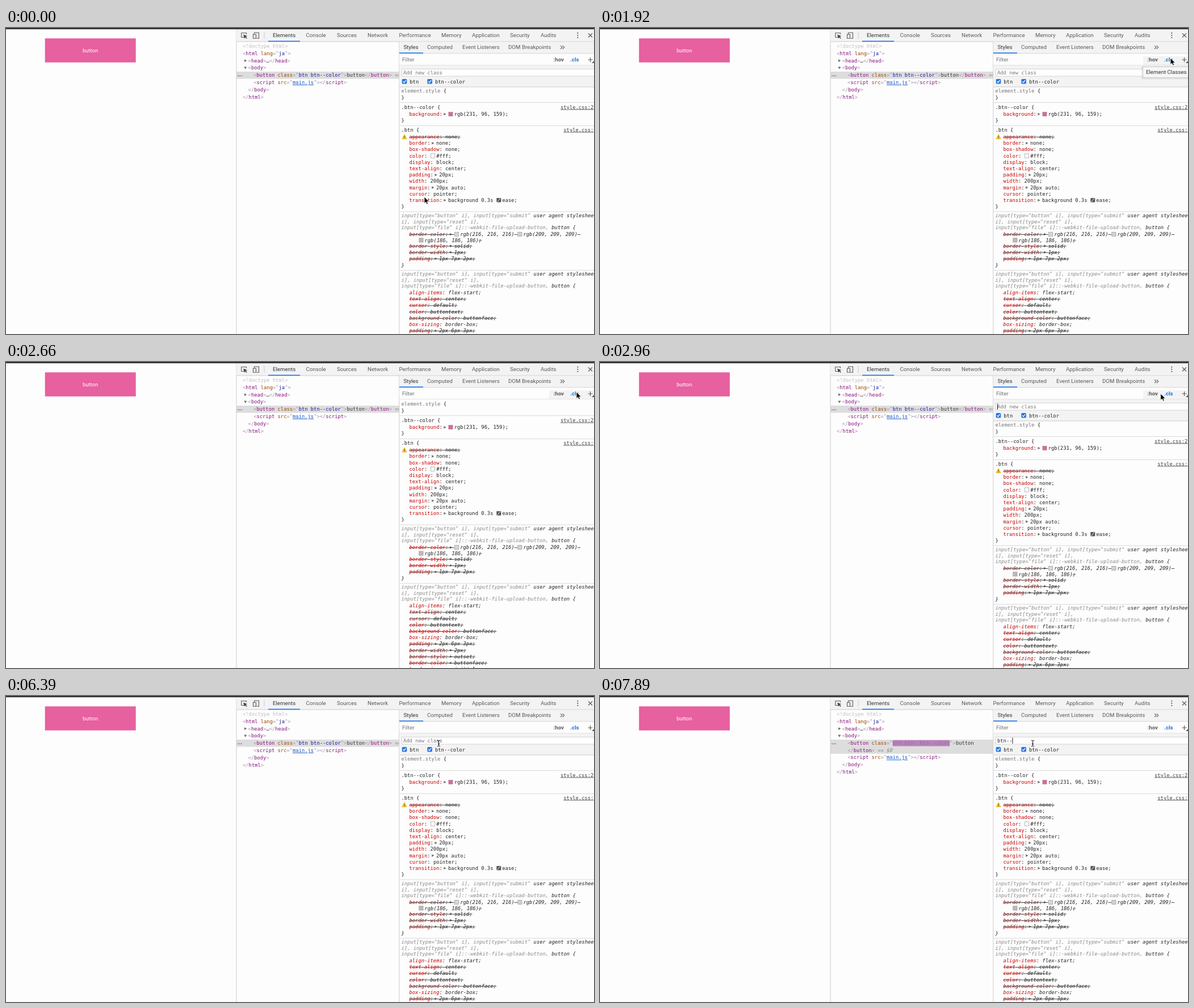
These frames come from a looping animation (1036 by 540 pixels, 8000 ms). An HTML page:

```html
<!DOCTYPE html>
<html lang="en">
<head>
<meta charset="utf-8">
<title>Toggling classes in the styles pane</title>
<style>
  html, body { margin: 0; width: 100%; height: 100%; overflow: hidden; background: #fdfdfd; }
  svg { display: block; }
  text { white-space: pre; font: 8.8px "DejaVu Sans Mono", monospace; fill: #222; }
  .ui { font: 9.7px Roboto, sans-serif; fill: #5a5a5a; }
  .dark { fill: #333; }
  .bold { font-weight: bold; }
  .blue { fill: #1a73e8; }
  .bracket { fill: #a894a6; }
  .tag { fill: #881280; }
  .attr { fill: #994500; }
  .value { fill: #1a1aa6; }
  .link { fill: #1155cc; text-decoration: underline; }
  .source { fill: #444; text-decoration: underline; }
  .prop { fill: #c80000; }
  .dim { fill: #888; }
  .hint { fill: #757575; }
  .slant, .slant text { font-style: italic; }
</style>
</head>
<body>
<svg id="stage" width="1036" height="540" viewBox="0 0 1036 540"></svg>
<script>
const CH = 5.298;          // advance of one monospace character
const EDGE = 696.5, INDENT = 710.5;
const STEP = 148.6, LOOP = 8000;

// All y values are the vertical middle of the line or shape.
const text = (x, y, body, cls = '') => `<text x="${x}" y="${y + 3}" class="${cls}">${body}</text>`;
const ui = (x, y, body, cls = '') => text(x, y + .4, body, 'ui ' + cls);
const span = (cls, body) => `<tspan class="${cls}">${body}</tspan>`;
const rect = (x, y, w, h, fill, extra = '') =>
  `<rect x="${x}" y="${y}" width="${w}" height="${h}" fill="${fill}" ${extra}/>`;
const path = (d, stroke, width = 1, fill = 'none') =>
  `<path d="${d}" fill="${fill}" stroke="${stroke}" stroke-width="${width}"/>`;
const rule = y => rect(693, y, 343, 1, '#dadada');
const strike = (x1, x2, y) => path(`M${x1} ${y + .5}H${x2}`, '#222', .8);
const arrow = (x, y) => path(`M${x} ${y - 2.3}l4.3 2.3l-4.3 2.3z`, 'none', 0, '#6e6e6e');
const chip = (x, y, color) => rect(x + .8, y - 3.7, 7.2, 7.2, color, 'stroke="#999" stroke-width=".7"');

function decl(y, name, value, { open, color, off } = {}) {
  const colon = INDENT + (name.length + 1) * CH;
  let x = colon + CH + (open ? 5 : 0);
  let out = text(INDENT, y, span('prop', name) + ':');
  if (open) out += arrow(colon + 2.6, y);
  if (color) { out += chip(x, y, color); x += 10.6; }
  out += text(x, y, value + ';');
  if (off) out += strike(INDENT, x + (value.length + 1) * CH, y);
  return out;
}

const decls = (y, list) => list.map((d, i) => decl(y + i * 11.2, ...d)).join('');
const OPEN = { open: true }, OFF = { off: true }, BOTH = { open: true, off: true };

const agentSelector = y =>
  text(EDGE, y, 'input[type="button" i], input[type="submit"', 'dim') +
  text(EDGE + 44 * CH, y, 'user agent stylesheet') +
  text(EDGE, y + 10.5, 'i], input[type="reset" i],', 'dim') +
  text(EDGE, y + 21, span('dim', 'input[type="file" i]::-webkit-file-upload-button, ') + 'button {');

function borderColor(y) {
  const first = INDENT + 14 * CH + 5, second = first + 10.6 + 19 * CH;
  const textEnd = second + 10.6 + 18 * CH;
  return text(INDENT, y, span('prop', 'border-color') + ':') + arrow(INDENT + 13 * CH + 2.6, y) +
    strike(INDENT, first, y) +
    chip(first, y, '#d8d8d8') + text(first + 10.6, y, 'rgb(216, 216, 216)') + strike(second - CH, second, y) +
    chip(second, y, '#d1d1d1') + text(second + 10.6, y, 'rgb(209, 209, 209)') + strike(textEnd, textEnd + CH, y) +
    chip(727, y + 10.5, '#bababa') + text(737.5, y + 10.5, 'rgb(186, 186, 186);') +
    strike(737.5 + 18 * CH, 737.5 + 19 * CH, y + 10.5);
}

const styleRules = () =>
  text(EDGE, 110.5, span('hint', 'element.style') + ' {') + text(EDGE, 123, '}') + rule(131) +
  text(EDGE, 139.5, '.btn--color {') + text(977, 139.5, 'style.css:2', 'source') +
  decl(152, 'background', 'rgb(231, 96, 159)', { open: true, color: '#e7609f' }) +
  text(EDGE, 163, '}') + rule(172) +
  text(EDGE, 179.5, '.btn {') + text(982.3, 179.5, 'style.css:', 'source') +
  path('M702 187.8L706.2 195.8H697.8Z', '#e0a800', .6, '#f9c81c') + rect(701.5, 190.3, 1, 3, '#5a4300') +
  rect(701.5, 194, 1, 1, '#5a4300') +
  decls(192, [
    ['appearance', 'none', OFF], ['border', 'none', OPEN], ['box-shadow', 'none'],
    ['color', '#fff', { color: '#fff' }], ['display', 'block'], ['text-align', 'center'],
    ['padding', '20px', OPEN], ['width', '200px'], ['margin', '20px auto', OPEN], ['cursor', 'pointer']]) +
  text(INDENT, 304, span('prop', 'transition') + ':') + arrow(INDENT + 11 * CH + 2.6, 304) +
  text(779, 304, 'background 0.3s') + rect(864.3, 300, 8, 7.6, '#555', 'rx="1"') +
  path('M865.5 306.3C869 306 867 301.6 871 301.4', '#fff', 1) + text(874.2, 304, 'ease;') +
  text(EDGE, 315, '}') + rule(323.5) +
  '<g class="slant">' + agentSelector(331) + borderColor(364) +
  decls(384.6, [['border-style', 'solid', BOTH], ['border-width', '1px', BOTH], ['padding', '1px 7px 2px', BOTH]]) +
  text(EDGE, 418.5, '}') + rule(427) + agentSelector(434) +
  decls(467, [
    ['align-items', 'flex-start'], ['text-align', 'center', OFF], ['cursor', 'default', OFF],
    ['color', 'buttontext', OFF], ['background-color', 'buttonface', OFF], ['box-sizing', 'border-box'],
    ['padding', '2px 6px 3px', BOTH], ['border-width', '2px', BOTH], ['border-style', 'outset', BOTH],
    ['border-color', 'buttonface', BOTH], ['border-image', 'initial', BOTH]]) + '</g>';

const checkbox = (x, y) => rect(x - 4.3, y - 4.3, 8.6, 8.6, '#2a76e0', 'rx="1.6"') +
  path(`M${x - 2.4} ${y}l1.8 2l3.2 -4.2`, '#fff', 1.3);

const classPane = () =>
  rect(693, 66, 343, 38, '#f3f3f3') + rect(693, 103.5, 343, 1, '#ccc') +
  rect(697.5, 72.5, 345, 12.5, '#fff', 'stroke="#ccc" stroke-width=".8"') + '<g id="entry"></g>' +
  checkbox(702, 94.3) + text(711.3, 94.5, 'btn') + checkbox(746.6, 94.3) + text(756, 94.5, 'btn--color');

const mainTabs = [['Elements', 470], ['Console', 528.5], ['Sources', 583], ['Network', 637], ['Performance', 692.5],
  ['Memory', 767], ['Application', 821], ['Security', 888], ['Audits', 942]];
const sideTabs = [['Styles', 700.5], ['Computed', 742], ['Event Listeners', 804], ['DOM Breakpoints', 885]];
const tabs = (list, y) => list.map(([name, x], i) => ui(x, y, name, i ? '' : 'dark')).join('');

const header = () =>
  rect(406, 2, 630, 22, '#f3f3f3') + rect(406, 23.5, 630, 1, '#ccc') +
  rect(462, 22.6, 56, 1.6, '#1a73e8') + tabs(mainTabs, 13) +
  path('M423.5 16.5H414.8V8.8H423.5V11', '#5a5a5a', 1.1) +
  path('M418.2 11.6L425.2 14.3L422.2 15.4L424.8 18L423.8 19L421.2 16.3L420 19Z', 'none', 0, '#444') +
  path('M437.5 11V8.3H445.5V18.3H441.5M435.5 11.3H440.5V18.3H435.5Z', '#5a5a5a', 1.1) +
  rect(454.5, 7, 1, 12, '#ccc') +
  [8.8, 12.8, 16.8].map(y => `<circle cx="1007.3" cy="${y}" r="1.1" fill="#5a5a5a"/>`).join('') +
  path('M1026 9.5l7 7m0 -7l-7 7', '#5a5a5a', 1.2) +
  rect(693, 24.5, 343, 20.5, '#f3f3f3') + rect(693, 44.5, 343, 1, '#ccc') +
  rect(693, 43.4, 42, 1.6, '#1a73e8') + tabs(sideTabs, 34) +
  path('M977 31.2l3 3l-3 3m3.7 -6l3 3l-3 3', '#5a5a5a', 1.1) +
  rect(693, 45.5, 343, 20.5, '#fdfdfd') + rect(693, 65.3, 343, .8, '#ddd') +
  `<g id="hover">${rect(957, 50, 79, 15, '#f3f3f3')}</g>` +
  ui(698, 56, 'Filter', 'hint') + ui(964.5, 56, ':hov', 'bold') + ui(994, 56, '.cls', 'bold blue') +
  path('M1029.5 52v8M1025.5 56h8', '#5a5a5a', 1.2) + path('M1036 58v4h-4z', 'none', 0, '#5a5a5a');

const tooltip = () =>
  rect(954, 67.5, 90, 23, '#000', 'opacity=".08"') +
  rect(956.5, 68.5, 90, 19, '#f6f6f6', 'stroke="#c4c4c4" stroke-width=".8"') + ui(962, 78, 'Element Classes', 'dark');

const openTag = (name, rest = '') => `&lt;${span('tag', name)}${rest}&gt;`;
const closeTag = name => `&lt;/${span('tag', name)}&gt;`;
const attr = (name, value, cls = 'value') => ` ${span('attr', name)}="${span(cls, value)}"`;

// The class list grows by `extra`; `fresh` runs from 0 (just changed) to 1 (settled).
function domTree(extra, fresh) {
  const classes = `btn ${extra}btn--color`, wrap = extra ? 12.3 : 0;
  const line = (level, y, body) => text(417 + level * 9.6, y, body, 'bracket');
  const list = `<tspan class="value" fill-opacity="${fresh ** 2}">${classes}</tspan>`;
  const tail = closeTag('button') + `<tspan class="dim slant"> == $0</tspan>`;
  return rect(406, 77, 287, 12.6 + wrap, '#dddddd') +
    (fresh < 1 ? rect(436.2 + 15 * CH, 78, classes.length * CH, 10.5, '#9e3699', `rx="1" opacity="${1 - fresh}"`) : '') +
    [409, 412, 415].map(x => `<circle cx="${x}" cy="84.3" r=".9" fill="#666"/>`).join('') +
    `<text x="417" y="35" fill="#c0c0c0" style="fill:#c0c0c0">&lt;!doctype html&gt;</text>` +
    line(0, 44.8, openTag('html', attr('lang', 'ja'))) +
    arrow(420, 57.6) + line(1, 57.6, openTag('head') + span('dark', '…') + closeTag('head')) +
    path('M419.3 68.5h5l-2.5 4.3z', 'none', 0, '#6e6e6e') + line(1, 70.4, openTag('body')) +
    line(2, 83.3, `&lt;${span('tag', 'button')} ${span('attr', 'class')}="${list}"&gt;${span('dark', 'button')}` +
      (wrap ? '' : tail)) +
    (wrap ? line(2, 95.6, tail) : '') +
    line(2, 96.1 + wrap, openTag('script', attr('src', 'main.js', 'link')) + closeTag('script')) +
    line(1, 108.9 + wrap, closeTag('body')) + line(0, 121.7 + wrap, closeTag('html'));
}

const $ = id => document.getElementById(id);
$('stage').innerHTML =
  rect(0, 0, 1036, 540, '#fdfdfd') + rect(68.7, 18.3, 160, 42.4, '#e7609f') +
  `<text x="148.6" y="43.4" text-anchor="middle" class="ui" style="font-size:9.4px;fill:#fff">button</text>` +
  '<g id="dom"></g>' + rect(405.5, 2, 1, 538, '#ccc') +
  rect(693, 66, 343, 474, '#fdfdfd') + rect(692.3, 24, 1, 516, '#ccc') +
  `<g id="rules">${styleRules()}</g><g id="classes">${classPane()}</g>` +
  header() + rect(0, 0, 1036, 2.2, '#2f2f33') + `<g id="tip">${tooltip()}</g>` +
  `<g id="pointer">${path('M0 0V11.4L2.7 9L4.4 13L6.5 12.1L4.8 8.3H8.4Z', '#fff', .8, '#000')}</g>` +
  `<g id="ibeam">${path('M760 78.3q2.5 0 2.5 1.6q0 -1.6 2.5 -1.6M762.5 79.5V87.5M760 88.8q2.5 0 2.5 -1.6q0 1.6 2.5 1.6M761 84.6h3', '#111', 1)}</g>`;

// [step, x, y] of the pointer tip
const pointerPath = [[0, 737, 298], [2, 732, 302], [3, 732, 302], [11, 1005, 53], [19, 1005, 53],
  [25, 772, 93], [27, 742, 98], [28, 742, 98], [30, 744, 97], [31, 744, 97], [33, 750, 96]];
// [step, typed text, previewed class, step of the last class change]
const typing = [[0, '', '', -99], [44, 'b', '', -99], [45, 'bt', 'b ', 45], [46, 'btn', 'bt ', 46],
  [47, 'btn', '', 46], [50, 'btn-', '', 46], [51, 'btn-', 'btn- ', 51], [53, 'btn--', 'btn- ', 51]];
const caretSpans = [[19, 23], [26, 30], [33, 36], [39, 43], [44, 99]];

const within = (step, from, to) => step >= from && step < to;
const show = (id, on) => $(id).setAttribute('visibility', on ? 'visible' : 'hidden');

function pointerAt(step) {
  const next = pointerPath.findIndex(key => key[0] > step);
  if (next < 0) return pointerPath.at(-1).slice(1);
  const [s0, x0, y0] = pointerPath[next - 1], [s1, x1, y1] = pointerPath[next];
  const p = (step - s0) / (s1 - s0), e = p * p * (3 - 2 * p);
  return [x0 + (x1 - x0) * e, y0 + (y1 - y0) * e];
}

function draw(step) {
  const closed = within(step, 14, 19);
  const [, typed, extra, changed] = typing.findLast(key => key[0] <= step);
  const age = Math.min(1, (step - changed) * STEP / 1120);
  const caret = caretSpans.some(([from, to]) => within(step, from, to));

  $('dom').innerHTML = domTree(extra, 1 - (1 - age) ** 2);
  $('rules').setAttribute('transform', `translate(0 ${closed ? -36.8 : 0})`);
  $('entry').innerHTML = (typed ? text(700, 78.5, typed) : text(700, 78.5, 'Add new class', 'hint')) +
    (caret ? rect(700 + typed.length * CH, 73.5, .9, 10.5, '#000') : '');
  show('classes', !closed);
  show('hover', within(step, 11, 25));
  show('tip', within(step, 12, 14));
  show('pointer', step < 43);
  show('ibeam', step >= 43);
  $('pointer').setAttribute('transform', `translate(${pointerAt(step)})`);
}

let shown = -1;
function tick() {
  const step = Math.floor((performance.now() % LOOP + 20) / STEP);
  if (step !== shown) draw(shown = step);
  requestAnimationFrame(tick);
}
tick();
</script>
</body>
</html>
```
